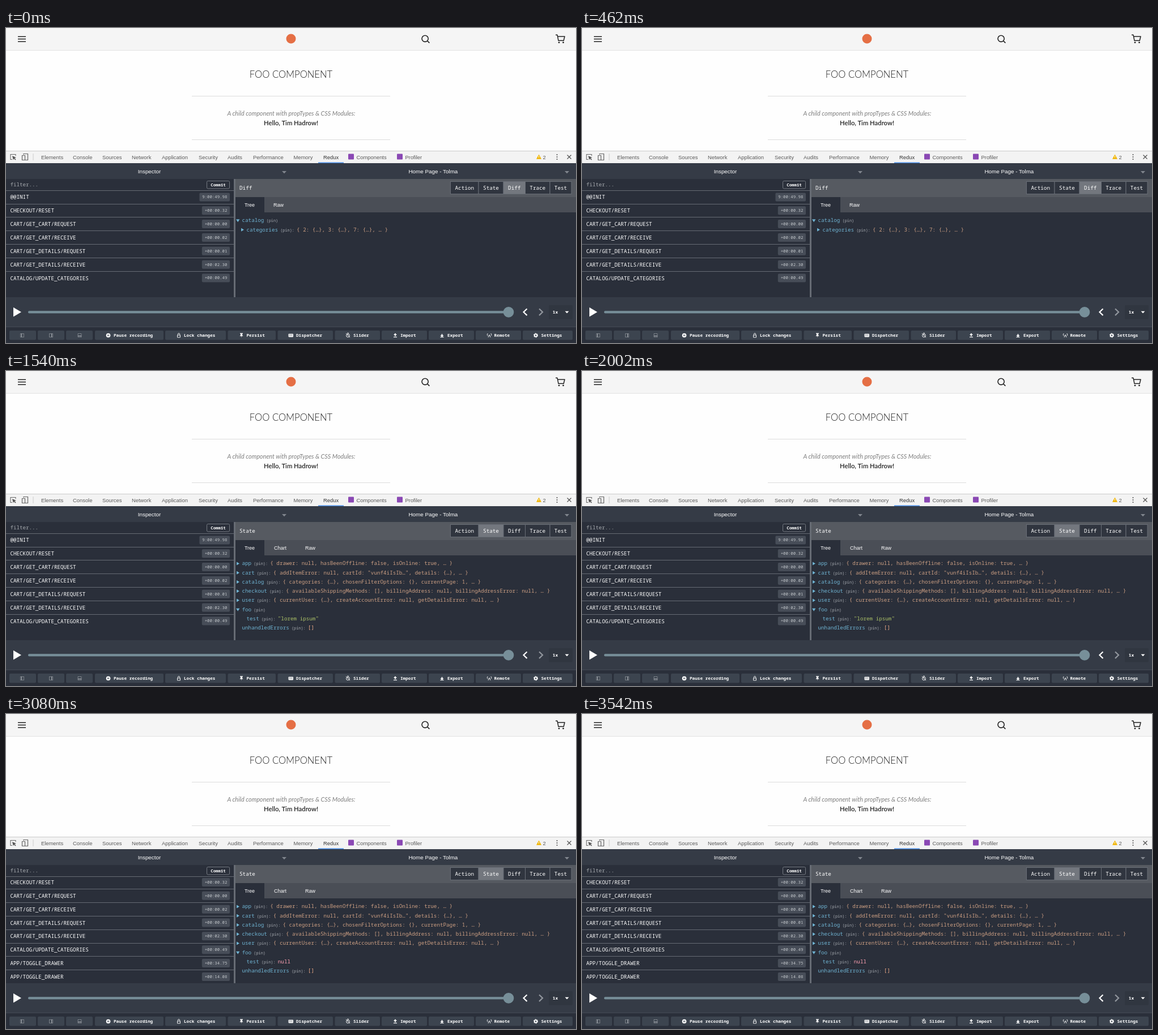
An HTML page for the animation above (3.85 s loop, 1006 by 557 pixels).

```html
<!DOCTYPE html>
<html lang="en">
<head>
<meta charset="utf-8">
<title>State inspector</title>
<style>
  html, body { margin: 0; width: 100%; height: 100%; overflow: hidden; background: #fff; }
  svg { display: block; width: 1006px; height: 557px; }
  .page { font-family: Lato, "Open Sans", sans-serif; }
  .ui { font-family: "Liberation Sans", Arial, sans-serif; }
  .mono { font-family: "Noto Sans Mono", "DejaVu Sans Mono", monospace; }
  .pin { font-size: 6.9px; fill: #a9adb3; }
</style>
</head>
<body>
<svg id="stage" viewBox="0 0 1006 557">
  <defs><clipPath id="listClip"><rect y="288" width="402" height="188"/></clipPath></defs>
</svg>
<script>
const STEP = 770;
const C = {
  dark: '#2a2f3a', bar: '#353b46', button: '#3c444f', badge: '#474d58', line: '#666b74',
  key: '#6fb3d2', value: '#cb9e82', empty: '#eda987', string: '#acc267', none: '#fb9fb1', slate: '#778f99'
};

const esc = s => s.replace(/&/g, '&amp;').replace(/</g, '&lt;');
const rect = (x, y, w, h, fill, extra = '') =>
  `<rect x="${x}" y="${y}" width="${w}" height="${h}" fill="${fill}" ${extra}/>`;
const path = (d, stroke, width = 1, extra = '') =>
  `<path d="${d}" fill="none" stroke="${stroke}" stroke-width="${width}" ${extra}/>`;
const shape = (d, fill) => `<path d="${d}" fill="${fill}"/>`;
const circle = (x, y, r, fill, extra = '') =>
  `<circle cx="${x}" cy="${y}" r="${r}" fill="${fill}" ${extra}/>`;
const label = (cls, size, fill) => (x, y, s, extra = '') =>
  `<text class="${cls}" x="${x}" y="${y}" font-size="${size}" fill="${fill}" ${extra}>${esc(s)}</text>`;
const MID = 'text-anchor="middle"';
const BOLD = 'font-weight="600"';

function shopPage() {
  const ink = '#222';
  return rect(0, 0, 1006, 218, '#fefefe') + rect(0, 0, 1006, 39, '#f5f5f5') +
    rect(0, 39, 1006, 1, '#e2e2e2') +
    path('M21 15.2H35M21 19.6H35M21 24H35', ink, 1.5) +
    circle(503, 19, 8.5, '#e56f45') +
    circle(739.6, 18.8, 5.6, 'none', `stroke="${ink}" stroke-width="1.6"`) +
    path('M743.6 22.8L747.4 26.4', ink, 1.6) +
    path('M970 12.3H973L975 22.3H984.2L986 15H973.6', ink, 1.5, 'stroke-linejoin="round"') +
    circle(976, 25.6, 1.4, ink) + circle(983.5, 25.6, 1.4, ink) +
    label('page', 16.6, ink)(503, 87.6, 'FOO COMPONENT', MID + ' font-weight="300"') +
    rect(328, 120, 350, 1, '#dcdcdc') + rect(328, 197, 350, 1, '#dcdcdc') +
    label('page', 10.8, '#808080')(503.5, 154.6, 'A child component with propTypes & CSS Modules:', MID + ' font-style="italic"') +
    label('page', 11.3, ink)(503, 171.5, 'Hello, Tim Hadrow!', MID + ' ' + BOLD);
}

function drawer() {
  const item = label('page', 11.6, '#333');
  return rect(0, 0, 1006, 217, '#000', 'opacity=".5"') + rect(0, 0, 252, 217, '#fefefe') +
    rect(0, 39, 252, 1, '#e0e0e0') + rect(0, 155, 252, 1, '#dcdcdc') +
    label('page', 11.1, '#333')(16.5, 24, 'MAIN MENU') +
    path('M227.5 15L236.5 24M236.5 15L227.5 24', '#222', 1.6) +
    ['Bottoms', 'Tops', 'Dresses'].map((s, i) => item(16.5, 63 + 40 * i, s)).join('') +
    rect(14, 78, 224, 1, '#dedede') + rect(14, 118, 224, 1, '#dedede') +
    rect(84, 175.5, 84, 22, '#212121', 'rx="11"') +
    label('page', 9, '#fff')(126, 189.7, 'Sign In', MID);
}

function devtoolsBar() {
  const tab = label('ui', 9.4, '#5a5a5a');
  const tabs = [['Elements', 62], ['Console', 118], ['Sources', 170], ['Network', 222],
    ['Application', 275], ['Security', 340], ['Audits', 391], ['Performance', 436],
    ['Memory', 507.5], ['Components', 618.5], ['Profiler', 704.5]];
  return rect(0, 217, 1006, 22, '#f3f3f3') + rect(0, 217, 1006, 1, '#cbcbcb') +
    tabs.map(([s, x]) => tab(x, 231.5, s)).join('') +
    label('ui', 9.4, '#333')(560, 231.5, 'Redux') + rect(551, 237.5, 45, 1.5, '#4a8ee6') +
    path('M11 232.5H8V223.5H17V226', '#666', 1.1) +
    shape('M11 226L18 229L15.2 230L17.6 232.6L16.4 233.6L14 231L12.8 233.4Z', '#555') +
    path('M31 224V222.5H38.5V233.5H34', '#666', 1.2) + path('M28.5 225.5H33.5V233.5H28.5Z', '#666', 1.2) +
    rect(47.5, 222, 1, 12, '#ccc') +
    rect(604, 222.5, 10, 10, '#8a48b4', 'rx="1"') + rect(690, 222.5, 10, 10, '#8a48b4', 'rx="1"') +
    shape('M940.5 223.5L945 231.7H936Z', '#f0b400') + rect(940, 226.3, 1, 3, '#fff') +
    tab(947.5, 231.5, '2') +
    [224, 228, 232].map(y => circle(972.5, y, 1.1, '#555')).join('') +
    path('M990.5 224.5L997.5 231.5M997.5 224.5L990.5 231.5', '#555', 1.3);
}

function inspectorFrame() {
  const head = label('ui', 9.85, '#fff');
  return rect(0, 239, 1006, 318, C.dark) + rect(0, 239, 1006, 28, C.bar) +
    head(253, 257.3, 'Inspector', MID) + head(710.5, 257.3, 'Home Page - Tolma') +
    shape('M487 253H495L491 257.3Z', '#81868e') + shape('M986 253H994L990 257.3Z', '#81868e') +
    label('mono', 9.2, '#a5a9ae')(7.5, 280.3, 'filter...') +
    rect(354.5, 270.5, 40, 13.5, C.dark, 'rx="2" stroke="#747981"') +
    label('mono', 7.35, '#fff')(374.5, 279.8, 'Commit', MID + ' ' + BOLD) +
    rect(0, 287, 402, 1, C.line) +
    rect(402, 267, 3, 209, '#676c74') +
    rect(405, 267, 601, 32, '#565a61') + rect(405, 299, 601, 27, '#4a4e56');
}

const ACTIONS = [
  ['@@INIT', '9:00:49.98'], ['CHECKOUT/RESET', '+00:00.32'], ['CART/GET_CART/REQUEST', '+00:00.00'],
  ['CART/GET_CART/RECEIVE', '+00:00.02'], ['CART/GET_DETAILS/REQUEST', '+00:00.01'],
  ['CART/GET_DETAILS/RECEIVE', '+00:02.30'], ['CATALOG/UPDATE_CATEGORIES', '+00:00.49'],
  ['APP/TOGGLE_DRAWER', '+00:34.75'], ['APP/TOGGLE_DRAWER', '+00:14.08']];

function actionList(count) {
  const pitch = 23.85;
  const top = Math.min(299, 464.5 - (count - 1) * pitch);
  const rows = ACTIONS.slice(0, count).map(([name, time], i) => {
    const y = top + i * pitch;
    const w = time.length * 4.41 + 9.5;
    return (i ? rect(0, Math.round(y - 12.3), 402, 1, C.line) : '') +
      label('mono', 9.22, '#fff')(7.5, y + 3.4, name) +
      rect(395 - w, y - 7.6, w, 15, C.badge, 'rx="2"') +
      label('mono', 7.35, '#c3c7cb')(390.3, y + 2.3, time, 'text-anchor="end"');
  });
  return `<g clip-path="url(#listClip)">${rows.join('')}</g>`;
}

function panelHeader(mode) {
  const edges = [784.5, 834, 878, 916.5, 960, 998];
  const tabs = mode === 'Diff' ? [['Tree', 430], ['Raw', 481]] : [['Tree', 430], ['Chart', 484], ['Raw', 537]];
  const text = label('mono', 9.3, '#fff');
  return text(412, 286, mode) +
    ['Action', 'State', 'Diff', 'Trace', 'Test'].map((s, i) => {
      const x = edges[i], w = edges[i + 1] - x;
      return rect(x, 271.5, w, 22, s === mode ? '#73777e' : '#30353f', 'stroke="#696e76"') +
        text(x + w / 2, 286, s, MID);
    }).join('') +
    rect(405, 299, 51, 27, C.dark) +
    tabs.map(([s, x]) => label('ui', 9, '#fff')(x, 316, s, MID)).join('');
}

// Each row: [key, value, arrow, depth, value colour]
function tree(rows) {
  return rows.map(([key, value, arrow, depth = 0, color = C.value], i) => {
    const x = 416.5 + depth * 8, y = 340.3 + i * 16.27;
    const ax = x - 9.5;
    const mark = arrow === 'open' ? shape(`M${ax - 1} ${y - 2}h6.4l-3.2 5z`, C.key)
      : arrow ? shape(`M${ax} ${y - 2.8}v6l5 -3z`, C.key) : '';
    return mark + `<text class="mono" x="${x}" y="${y + 3}" font-size="9.25" fill="${C.key}">${key}` +
      `<tspan class="pin"> (pin)${value ? ': ' : ''}</tspan><tspan fill="${color}">${value}</tspan></text>`;
  }).join('');
}

const diffRows = [
  ['catalog', '', 'open'],
  ['categories', '{ 2: {…}, 3: {…}, 7: {…}, … }', 'closed', 1]];

const stateRows = (drawerValue, foo) => [
  ['app', `{ drawer: ${drawerValue}, hasBeenOffline: false, isOnline: true, … }`, 'closed'],
  ['cart', '{ addItemError: null, cartId: "vunf4iIsIb…", details: {…}, … }', 'closed'],
  ['catalog', '{ categories: {…}, chosenFilterOptions: {}, currentPage: 1, … }', 'closed'],
  ['checkout', '{ availableShippingMethods: [], billingAddress: null, billingAddressError: null, … }', 'closed'],
  ['user', '{ currentUser: {…}, createAccountError: null, getDetailsError: null, … }', 'closed'],
  ...foo,
  ['unhandledErrors', '[]', '', 0, C.empty]];

const openFoo = (value, color) => [['foo', '', 'open'], ['test', value, '', 1, color]];

function player() {
  return rect(0, 476, 1006, 52, C.bar) +
    shape('M13 494L27 502.3L13 510.6Z', '#fff') +
    rect(39, 500.2, 848, 4.4, C.slate, 'rx="2"') + circle(887, 502.4, 9.3, C.slate) +
    path('M919.5 496.5L913.5 502.3L919.5 508.1', '#fff', 2.2) +
    path('M941 496.5L947 502.3L941 508.1', '#92979e', 2.2) +
    rect(958, 490, 42, 25, '#303640', 'rx="2"') +
    label('mono', 7.8, '#fff')(964.8, 505.3, '1x', BOLD) +
    shape('M986.5 500.7H993.5L990 504.5Z', '#fff');
}

function bottomBar() {
  const W = '#fff', y = 543.5;
  const grid = x => path(`M${x - 3} ${y - 3}h6v6h-6z`, '#b4b8bd', 1, 'stroke-dasharray="1 1"');
  const arrow = (x, dir) => shape(`M${x - 3} ${y - .5}h6l-3 ${-3.5 * dir}z`, W) +
    rect(x - .8, y - 2.5, 1.6, 4, W) + rect(x - 3, y + 2.4, 6, 1.2, W);
  const icons = [
    grid(28.5) + path(`M27.5 ${y - 3}v6`, '#b4b8bd'),
    grid(79.5) + path(`M80.5 ${y - 3}v6`, '#b4b8bd'),
    grid(130) + path(`M127 ${y + 1}h6`, '#b4b8bd'),
    circle(180.5, y, 3.8, W) + rect(179, y - 1.5, 1, 3, C.button) + rect(181, y - 1.5, 1, 3, C.button),
    path(`M302.5 ${y - .5}h5v4h-5zM303.4 ${y - .5}v-1.6a1.6 1.6 0 0 1 3.2 0v1.6`, W, .9),
    shape(`M413 ${y - 4}h5v1l-1 .5v2l1.5 1.8h-2.6l-.4 3l-.4 -3h-2.6l1.5 -1.8v-2l-1 -.5z`, W),
    rect(498.5, y - 2.7, 8.5, 5.6, W, 'rx=".8"') +
      path(`M499.7 ${y - 1}h6M499.7 ${y + .6}h6`, C.button, .8, 'stroke-dasharray="1 .7"'),
    circle(603.5, y + .3, 2.9, 'none', 'stroke="#fff"') + path(`M600 ${y - 3.6}l7 7.2M603.5 ${y - 1.5}v2M602 ${y - 4}h3`, W, .9),
    arrow(687, 1), arrow(769.5, -1),
    path(`M853 ${y - 1}l-2 4.5M853 ${y - 1}l2 4.5M850.2 ${y - 3.5}q-2 2.2 0 4.4M855.8 ${y - 3.5}q2 2.2 0 4.4`, W, .9),
    circle(935, y, 2.3, 'none', 'stroke="#fff" stroke-width="1.9"') +
      circle(935, y, 3.6, 'none', 'stroke="#fff" stroke-width="1" stroke-dasharray="1.9 1.87"')];
  const buttons = [[6, 53], [56, 103], [106, 153], [157, 278, 'Pause recording', 190],
    [281, 388, 'Lock changes', 314], [391.5, 476, 'Persist', 424.5], [479.5, 577, 'Dispatcher', 512],
    [580.5, 660, 'Slider', 613], [663, 743, 'Import', 696], [746, 826, 'Export', 779],
    [829, 909, 'Remote', 861.5], [912, 1000, 'Settings', 944.5]];
  return rect(0, 528, 1006, 29, C.dark) + rect(0, 528, 1006, 1, '#454b55') +
    buttons.map(([a, b, s, x], i) => rect(a, 535, b - a, 16.5, C.button, 'rx="2"') + icons[i] +
      (s ? label('mono', 7.7, W)(x, 546.4, s, BOLD) : '')).join('');
}

const scenes = [
  actionList(7) + panelHeader('Diff') + tree(diffRows),
  actionList(7) + panelHeader('State') + tree(stateRows('null', [['foo', '{ test: "lorem ipsu…" }', 'closed']])),
  actionList(7) + panelHeader('State') + tree(stateRows('null', openFoo('"lorem ipsum"', C.string))),
  drawer() + actionList(8) + panelHeader('State') + tree(stateRows('"nav"', openFoo('"nav"', C.string))),
  actionList(9) + panelHeader('State') + tree(stateRows('null', openFoo('null', C.none)))];

const stage = document.getElementById('stage');
stage.insertAdjacentHTML('beforeend',
  shopPage() + devtoolsBar() + inspectorFrame() + player() + bottomBar() +
  scenes.map(s => `<g class="scene">${s}</g>`).join(''));

// Hard cuts: every scene is visible for exactly one step of the loop.
stage.querySelectorAll('.scene').forEach((scene, i) => {
  const frames = [...scenes, null].map((_, k) => ({ opacity: k === i ? 1 : 0, easing: 'steps(1, end)' }));
  scene.animate(frames, { duration: STEP * scenes.length, iterations: Infinity });
});
</script>
</body>
</html>
```
